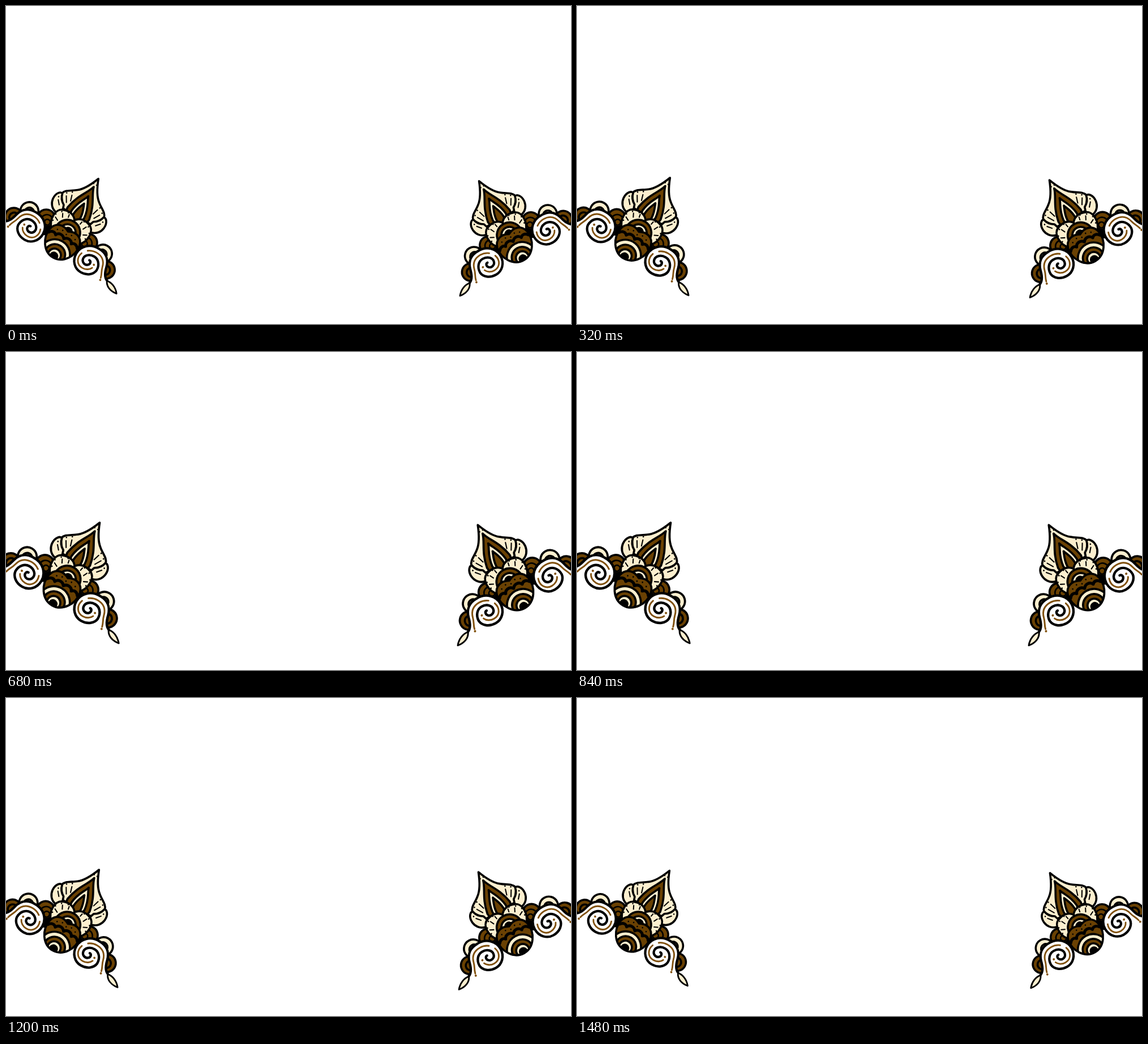
An HTML page that plays this animation: 998 px wide and 561 px high, repeating every 1520 ms.

```html
<!DOCTYPE html>
<html lang="en">
<head>
<meta charset="utf-8">
<title>Corner ornaments</title>
<style>
  html, body { margin: 0; width: 100%; height: 100%; overflow: hidden; background: #fff; }
  svg { display: block; width: 998px; height: 561px; }
  .k { stroke: #000; stroke-width: 3.6; }
  .thick { stroke-width: 4.2; }
  .thin { stroke-width: 2.8; }
  .n { stroke: #000; stroke-width: 2; fill: none; }
  .c { fill: #fcefcf; }
  .b { fill: #6a4103; }
  .w { fill: #fff; }
  .o { fill: none; }
  .t { fill: none; stroke: #80500c; stroke-width: 2.8; }
  .d { fill: none; stroke: #000; stroke-width: 2.6; }
  .td { fill: none; stroke: #80500c; stroke-width: 3.8; }
</style>
</head>
<body>
<svg viewBox="0 0 998 561" stroke-linecap="round" stroke-linejoin="round">
  <defs>
    <!-- Halves of the ornament; the axis of symmetry is x = 0 -->
    <g id="lobe">
      <path class="k c" d="M-30-62C-37-66-41-72-42-78C-46-80-53-74-52-62C-51-54-46-46-36-44L-24-44Z"/>
      <path class="n" d="M-26-84L-23-74M-34-78L-28-68M-43-65L-37-58"/>
      <path class="d" d="M-28-89h0M-36-83h0M-17-102h0M-45-70h0M-3-121h0"/>
    </g>
    <g id="petal">
      <path class="k c" d="M-27-14C-40-26-40-50-26-54C-13-59-4-54 0-48L0-20Z"/>
      <path class="n" d="M-32-36L-26-33M-24-48L-21-42M-13-52L-12-47"/>
      <path class="d" d="M-33-29h0M-34-41h0M-27-50h0M-16-54h0"/>
    </g>
    <g id="side">
      <path d="M-26-28L-40-30L-50-20L-34 4L-26 0Z"/>
      <g class="k">
        <circle class="b" cx="-43" cy="-25" r="15.5"/>
        <g class="o" stroke-width="2.6">
          <circle cx="-40" cy="-22" r="10.5"/>
          <circle cx="-38" cy="-20" r="5"/>
        </g>
        <circle class="b" cx="-94" cy="1" r="15.5"/>
        <circle class="o" cx="-93" cy="2" r="8.5"/>
        <circle class="c" cx="-75" cy="-21" r="16"/>
        <circle class="c" cx="-74" cy="-19" r="8.5"/>
      </g>
      <path class="w" d="M-106 17C-97 14-94 4-92-4C-88-19-77-25-65-25C-46-26-34-12-34 2C-34 17-45 27-57 27C-70 27-79 19-80 10L-90 33Z"/>
      <path class="k o thick" d="M-106 17C-97 14-94 4-92-4C-88-19-77-25-65-25C-46-26-34-12-34 2C-34 17-45 27-57 27C-70 27-79 19-80 10C-80-2-72-9-64-9C-54-9-48-2-49 4C-50 11-58 13-62 9C-65 6-64 1-60 1"/>
      <path class="t" d="M-93 18C-91 10-88 8-86 0C-83-12-75-17-64-17C-58-17-53-15-49-12M-42-3C-38 8-44 19-56 19C-63 19-69 15-71 10"/>
      <path class="td" d="M-94 21.500h0M-71 4h0"/>
      <path class="k c thin" d="M-105 17C-113 15-124 19-131 28C-119 30-109 26-105 17Z"/>
    </g>
    <path id="bud" d="M0-25C12-32 26-29 30-14C34 6 20 28 0 28C-20 28-34 6-30-14C-26-29-12-32 0-25Z"/>
    <clipPath id="inside"><use href="#bud"/></clipPath>
    <g id="ornament" transform="translate(97 419.500) rotate(30)">
      <path class="k c" d="M0-132.500C-6-117-14-103-22-97C-30-90-41-87-43-78C-40-70-34-64-28-56L28-56C34-64 40-70 43-78C41-87 30-90 22-97C14-103 6-117 0-132.500Z"/>
      <use href="#lobe"/>
      <use href="#lobe" transform="scale(-1 1)"/>
      <g class="k">
        <path class="b" d="M0-116C-4-101-17-90-22-62L-20-46H20L22-62C17-90 4-101 0-116Z"/>
        <path class="c" d="M0-97C-3-87-11-80-13-60L-11-46H11L13-60C11-80 3-87 0-97Z"/>
        <path class="b" d="M0-82C-2-76-6-70-7-58V-46H7V-58C6-70 2-76 0-82Z"/>
      </g>
      <g transform="translate(-2 -1)">
        <use href="#side"/>
        <use href="#side" transform="scale(-1 1)"/>
      </g>
      <use href="#petal"/>
      <use href="#petal" transform="scale(-1 1)"/>
      <g class="k">
        <circle class="b" cx="0" cy="-23" r="22.500"/>
        <circle class="c" cx="0" cy="-23" r="14.500"/>
        <circle cx="0" cy="-25" r="6.500"/>
      </g>
      <g clip-path="url(#inside)">
        <use href="#bud" class="b"/>
        <path class="n" style="stroke-width:5" d="M-29-7C-25-13-19-13-16-9C-13-16-4-16 0-10C4-16 13-16 16-9C19-13 25-13 29-7"/>
        <path class="d" d="M-18-19h0M-9-22h0M0-19h0M9-22h0M18-19h0"/>
        <g class="k">
          <circle class="c" cx="0" cy="22" r="27"/>
          <circle class="b" cx="0" cy="22" r="18.500"/>
          <circle class="c" cx="0" cy="23" r="11.500"/>
          <circle cx="0" cy="25" r="6"/>
        </g>
      </g>
      <use href="#bud" class="k o"/>
    </g>
    <g id="pulse"><use href="#ornament"/></g>
  </defs>
  <use href="#pulse"/>
  <use href="#pulse" transform="matrix(-1 -.008 -.008 1 1001.240 5.440)"/>
</svg>
<script>
  const LOOP = 1520, STEP = 40, GROWTH = 0.056;
  const pulse = document.getElementById('pulse');

  function draw(ms) {
    const t = Math.floor((ms % LOOP) / STEP) * STEP;
    const swell = 1 - Math.abs(2 * t / LOOP - 1);
    const s = 1 + GROWTH * swell;
    pulse.setAttribute('transform', `translate(118 379) scale(${s}) translate(-118 -379)`);
  }

  const start = performance.now();
  function tick() {
    draw(performance.now() - start);
    requestAnimationFrame(tick);
  }
  tick();
</script>
</body>
</html>
```
